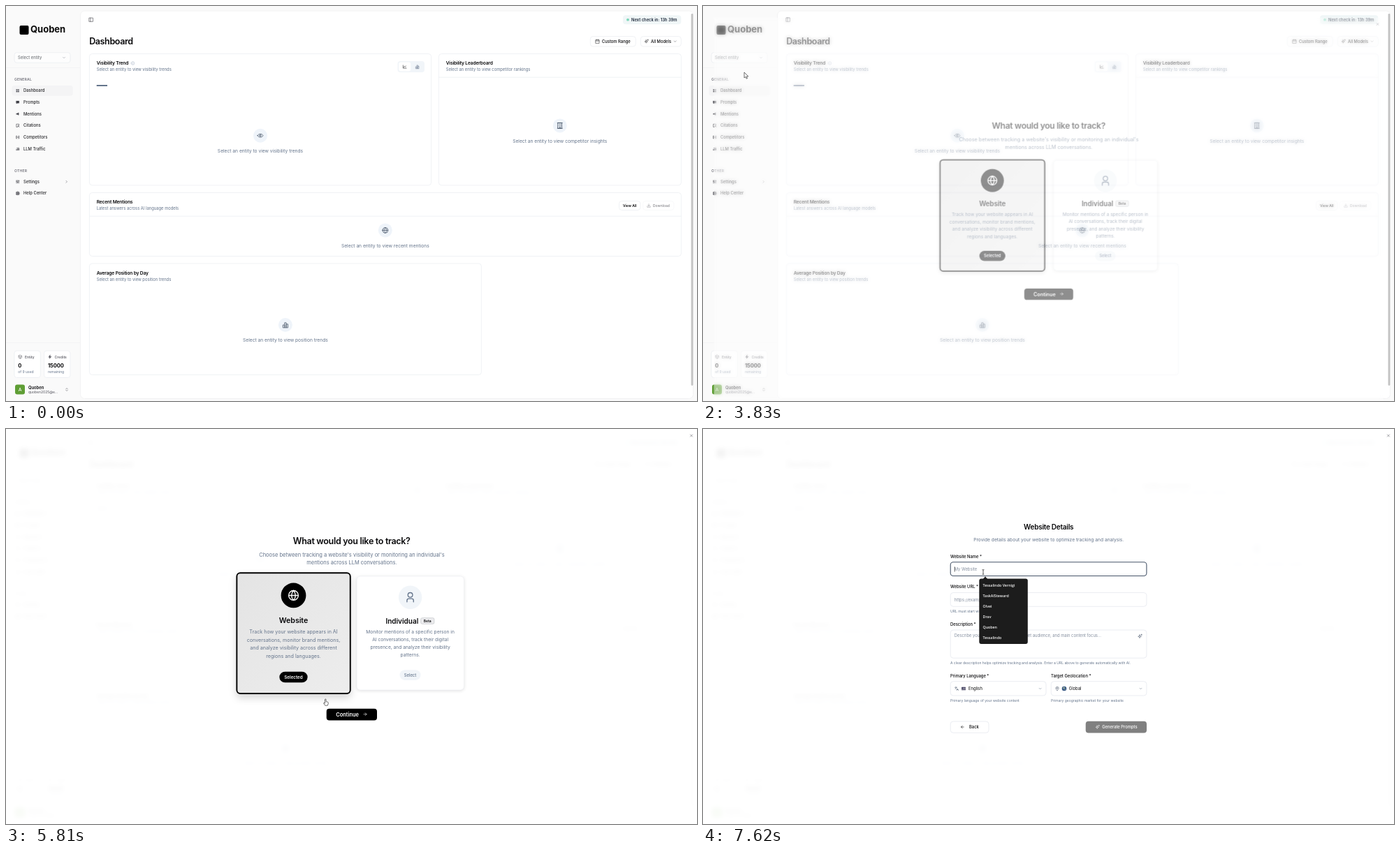
These frames come from a looping animation (989x566 px, 8000 ms). An HTML page:

```html
<!DOCTYPE html>
<html lang="en">
<head>
<meta charset="utf-8">
<title>Dashboard walkthrough</title>
<style>
  html, body { margin: 0; width: 100%; height: 100%; overflow: hidden; background: #fafafa; }
  svg, #dialog { position: absolute; inset: 0; width: 100%; height: 100%; }
  svg { overflow: hidden; font-family: Inter, sans-serif; }
  text { white-space: pre; }
  #dialog { background: rgba(255, 255, 255, .955); backdrop-filter: blur(3px); }
  .soft { filter: drop-shadow(0 1.5px 2px rgba(0, 0, 0, .12)); }
</style>
</head>
<body>
<svg id="page" viewBox="0 0 989 566"></svg>
<div id="dialog"><svg id="steps" viewBox="0 0 989 566"></svg></div>
<svg id="top" viewBox="0 0 989 566"></svg>
<script>
const XS = 5, SM = 5.83, MD = 6.66, LG = 7.49, XL = 9.99, XXL = 12.49;
const INK = '#09090b', SLATE = '#64748b', LINE = '#e6eaef', PALE = '#f1f5f9';
const $ = id => document.getElementById(id);

// Drawing helpers: text is placed by its vertical middle, icons by their centre on a 24-unit grid.
const text = (x, y, s, size = SM, weight = 400, fill = INK, anchor = 'start', extra = '') =>
  `<text x="${x}" y="${y + size * .36}" font-size="${size}" font-weight="${weight}" fill="${fill}" text-anchor="${anchor}" ${extra}>${s}</text>`;
const mid = (x, y, s, size, weight, fill, extra) => text(x, y, s, size, weight, fill, 'middle', extra);
const tight = 'letter-spacing="-.025em"';
const rect = (x, y, w, h, r, fill = '#fff', stroke = 'none', sw = .6, extra = '') =>
  `<rect x="${x}" y="${y}" width="${w}" height="${h}" rx="${r}" fill="${fill}" stroke="${stroke}" stroke-width="${sw}" ${extra}/>`;
const line = (x1, y, x2, stroke = LINE, sw = .6) => `<path d="M${x1} ${y}H${x2}" stroke="${stroke}" stroke-width="${sw}"/>`;
const circle = (x, y, r, fill) => `<circle cx="${x}" cy="${y}" r="${r}" fill="${fill}"/>`;
const icon = (x, y, size, name, stroke = SLATE, fill = 'none', sw = 2) =>
  `<path d="${icons[name]}" transform="translate(${x - size / 2} ${y - size / 2}) scale(${size / 24})" fill="${fill}" stroke="${stroke}" stroke-width="${sw}" stroke-linecap="round" stroke-linejoin="round"/>`;

const ring = 'M2 12a10 10 0 1 0 20 0a10 10 0 1 0-20 0';
const icons = {
  down: 'M6 9l6 6 6-6', right: 'M9 18l6-6-6-6', upDown: 'M7 15l5 5 5-5M7 9l5-5 5 5',
  panel: 'M3 3h18v18H3zM9 3v18',
  calendar: 'M8 2v4M16 2v4M3 4h18v18H3zM3 10h18',
  sparkles: 'M11 5l2 6 6 2-6 2-2 6-2-6-6-2 6-2zM20 2v5M17.500 4.500h5',
  eye: 'M2 12c4-8 16-8 20 0-4 8-16 8-20 0zM9 12a3 3 0 1 0 6 0a3 3 0 1 0-6 0',
  globe: ring + 'M2 12h20M12 2c5.500 6 5.500 14 0 20-5.500-6-5.500-14 0-20',
  building: 'M5 2h14v20H5zM9 6h1M14 6h1M9 10h1M14 10h1M9 14h1M14 14h1M10 22v-4h4v4M3 22h18M3 2h18',
  bars: 'M3 21v-9h6v9zM9 21V4h6v17zM15 21V9h6v12z',
  info: ring + 'M12 16v-4M12 8h.01',
  trend: 'M3 4v16h18M19 8l-5 5-4-3-4 5',
  download: 'M12 3v12M7 10l5 5 5-5M3 16v5h18v-5',
  plus: 'M5 12h14M12 5v14',
  box: 'M12 2l9 5v10l-9 5-9-5V7zM3 7l9 5 9-5M12 12v10',
  bolt: 'M13 2L4 14h7l-1 8L20 10h-8z',
  user: 'M7 7a5 5 0 1 0 10 0a5 5 0 1 0-10 0M5 22v-3a4 4 0 0 1 4-4h6a4 4 0 0 1 4 4v3',
  next: 'M5 12h14M12 5l7 7-7 7', back: 'M19 12H5M12 19l-7-7 7-7',
  close: 'M18 6L6 18M6 6l12 12',
  pin: 'M12 22c-4-5-8-8-8-12a8 8 0 0 1 16 0c0 4-4 7-8 12zM9 10a3 3 0 1 0 6 0a3 3 0 1 0-6 0',
  translate: 'M5 8l6 6M4 14l6-6 2-3M2 5h12M7 2h1M22 22l-5-10-5 10M14 18h6',
  grid: 'M4 4h6v6H4zM14 4h6v6h-6zM4 14h6v6H4zM14 14h6v6h-6z',
  chat: 'M3 4h18v13H11l-5 4v-4H3z',
  horn: 'M4 9h5l9-5v16l-9-5H4zM21 10v4',
  search: 'M20 10V3H4v18h7M13 15a3 3 0 1 0 6 0a3 3 0 1 0-6 0M18.500 17.500L22 21',
  versus: 'M7 4H3v16h4M17 4h4v16h-4M9 9v6M15 9v6',
  traffic: 'M3 20v-5h4v5zM10 20v-9h4v9zM17 20V8h4v12zM4 9l6-4 4 2 6-4',
  sliders: 'M5 3v18M12 3v18M19 3v18M3 9h4M10 15h4M17 7h4'
};

function navItem(y, label, name, solid) {
  return icon(16.7, y, 5.6, name, '#3f3f46', solid ? '#3f3f46' : 'none', solid ? 1 : 2.6) + text(25, y, label, SM, 500, '#27272a');
}
function card(x, y, w, h, title, subtitle, divider) {
  return rect(x, y, w, h, 4, '#fff', LINE) + text(x + 10.3, y + 13.6, title, MD, 600, INK, 'start', tight) +
    text(x + 10.3, y + 22.7, subtitle, SM, 400, SLATE) + (divider ? line(x, y + 33.7, x + w) : '');
}
const empty = (x, y, name, label) =>
  circle(x, y, 10, '#eff4fa') + icon(x, y, 9.5, name, '#475569') + mid(x, y + 22, label, MD, 400, SLATE);
const stat = (x, name, label, value, note, fill) =>
  rect(x, 494, 37.300, 38.500, 3.500, '#fff', LINE) + icon(x + 8.3, 502.7, 6, name, '#52525b', fill) +
  text(x + 15, 502.7, label, XS, 500, '#52525b') + text(x + 5.3, 515, value, LG, 700) + text(x + 5.3, 524, note, XS, 400, SLATE);

const main = [['Dashboard', 'grid', 1], ['Prompts', 'chat', 1], ['Mentions', 'horn', 1],
  ['Citations', 'search', 0], ['Competitors', 'versus', 0], ['LLM Traffic', 'traffic', 1]];

$('page').innerHTML =
  rect(0, 0, 989, 566, 0, '#fafafa') +
  rect(106.5, 7, 877, 555.5, 6, '#fff', '#f0f0f1', .8) +
  // sidebar
  rect(19.5, 28, 13, 13, 2, '#000') + text(35, 33.6, 'Quoben', 13, 700, '#0a0a0a') +
  rect(12, 66.7, 80, 14.6, 3.5, '#fdfdfd', '#e4e7ec') + text(17, 74, 'Select entity', SM, 400, '#5f6368') + icon(83, 74, 6, 'down', '#8b8f98') +
  line(0, 88.5, 106, '#f0f0f1') + line(0, 482.500, 106, '#f0f0f1') +
  text(12, 105.2, 'GENERAL', XS, 600, '#71717a', 'start', 'letter-spacing=".05em"') +
  rect(8.3, 114, 87.5, 14.6, 3.5, '#f4f4f5') +
  main.map(([label, name, solid], i) => navItem(121.3 + i * 16.68, label, name, solid)).join('') +
  text(12, 236, 'OTHER', XS, 600, '#71717a', 'start', 'letter-spacing=".05em"') +
  navItem(251.8, 'Settings', 'sliders') + icon(86.7, 251.8, 6, 'right', '#52525b') +
  navItem(268.4, 'Help Center', 'info') + circle(16.7, 268.4, 2.7, '#3f3f46') + icon(16.7, 268.4, 5, 'info', '#fff', 'none', 2.5) +
  stat(12, 'box', 'Entity', '0', 'of 9 used', 'none') + stat(54.6, 'bolt', 'Credits', '15000', 'remaining', '#52525b') +
  rect(13, 542.5, 14, 14, 3, '#5f9e35') + mid(20, 549.6, 'A', MD, 500, '#fff') +
  text(32, 546.5, 'Quoben', SM, 600) + text(32, 553.5, 'quoben2025@e...', XS, 400, '#52525b') + icon(87, 549.6, 6, 'upDown', '#3f3f46') +
  // header
  icon(121.8, 19.7, 7, 'panel', '#3f3f46') +
  rect(883, 13.2, 83.300, 13, 4, '#f0f6f7') + `<circle id="pulse" cx="890" cy="19.7" r="1.9" fill="#10b981"/>` +
  text(895, 19.7, 'Next check in: 13h 39m', SM, 600, '#1e293b') +
  text(119.2, 50.7, 'Dashboard', XXL, 600, INK, 'start', 'letter-spacing="-.03em"') +
  rect(836.3, 43.5, 65, 14.5, 4, '#fff', LINE) + icon(846.6, 50.7, 6.5, 'calendar', '#27272a') + text(853, 50.7, 'Custom Range', SM, 500) +
  rect(908.3, 43.5, 58, 14.5, 4, '#fff', LINE) + icon(916.5, 50.7, 6.5, 'sparkles', '#27272a') + text(923, 50.7, 'All Models', SM, 500) + icon(957.6, 50.7, 6, 'down', '#52525b') +
  // cards
  card(119.4, 68.5, 489.2, 188.4, 'Visibility Trend', 'Select an entity to view visibility trends') +
  icon(181.5, 82, 5.5, 'info', '#94a3b8') + line(129.700, 114, 145, SLATE, 2) +
  rect(560.5, 79, 38.5, 16, 4, PALE) + rect(562.2, 80.6, 17, 12.800, 3, '#fff') +
  icon(570.7, 87, 6.3, 'trend', INK) + icon(588.700, 87, 6.3, 'bars', SLATE) +
  empty(364, 185.7, 'eye', 'Select an entity to view visibility trends') +
  card(619.4, 68.5, 347, 188.4, 'Visibility Leaderboard', 'Select an entity to view competitor rankings', true) +
  empty(792.8, 171.4, 'building', 'Select an entity to view competitor insights') +
  card(119.4, 267.5, 847, 91, 'Recent Mentions', 'Latest answers across AI language models', true) +
  rect(877.5, 279.500, 30.500, 13, 4, '#fff', LINE) + mid(892.700, 286, 'View All', XS, 600) +
  rect(911.700, 279.500, 44.300, 13, 4, '#fff', '#f3f5f7') + icon(920, 286, 6, 'download', '#84848a') + text(926, 286, 'Download', XS, 500, '#84848a') +
  empty(542.8, 321.4, 'globe', 'Select an entity to view recent mentions') +
  card(119.4, 369, 561, 159.5, 'Average Position by Day', 'Select an entity to view position trends') +
  empty(399.9, 457, 'bars', 'Select an entity to view position trends') +
  rect(980.6, 11, 2.8, 533, 1.4, '#c3c3c3') +
  // entity menu
  `<g id="menu">${rect(12, 84, 80.5, 16.700, 3.5, '#fff', '#e4e7ec', .6, 'class="soft"')}${rect(13.700, 85.700, 77, 13.200, 2.5, PALE)}` +
  icon(20.4, 92, 6, 'plus', '#475569') + text(27, 92, 'Add new tracking', SM, 500, '#1e293b') + '</g>';

// First step: choose what to track
const lines = (x, y, rows) => rows.map((row, i) => mid(x, y + i * 10.8, row, MD, 400, SLATE)).join('');
const choice =
  mid(494.7, 160.200, 'What would you like to track?', XXL, 600, INK, tight) +
  mid(494.9, 180.3, "Choose between tracking a website's visibility or monitoring an individual's", LG, 400, SLATE) +
  mid(494.9, 191.8, 'mentions across LLM conversations.', LG, 400, SLATE) +
  rect(502, 211, 153.4, 163, 5, '#fff', '#eceff3', .6, 'class="soft"') +
  circle(578.600, 241.200, 16.700, PALE) + icon(578.600, 241.200, 16, 'user', SLATE) +
  text(543.400, 275, 'Individual', XL, 600) + rect(593.700, 270.700, 19.200, 8.600, 2, '#ececee', '#b9bcc2') + mid(603.300, 275, 'Beta', XS, 600) +
  lines(578.600, 290.800, ['Monitor mentions of a specific person in', 'AI conversations, track their digital', 'presence, and analyze their visibility', 'patterns.']) +
  rect(563.500, 345.200, 30, 14.700, 7.300, PALE) + mid(578.500, 352.600, 'Select', SM, 500, SLATE) +
  '<g id="website">' + rect(335.700, 211.900, 151.700, 161.400, 4.600, 'url(#shade)', '#000', 1.800, 'id="websiteBox"') +
  circle(411.500, 242, 16.700, '#000') + icon(411.500, 242, 15.500, 'globe', '#fff') +
  mid(411.500, 275.200, 'Website', XL, 600, INK, 'letter-spacing="-.01em"') +
  lines(411.500, 290.900, ['Track how your website appears in AI', 'conversations, monitor brand mentions,', 'and analyze visibility across different', 'regions and languages.']) +
  rect(392.700, 344, 37.600, 14.700, 7.350, '#000') + mid(411.500, 351.400, 'Selected', SM, 600, '#fff') + '</g>' +
  rect(458.700, 400.800, 72.300, 16.700, 4, '#000', 'none', 0, 'id="continue"') + text(472.200, 409, 'Continue', LG, 600, '#fff') + icon(514, 408.700, 7, 'next', '#fff');

// Second step: website details
const label = (x, y, s) => text(x, y, s + ' *', SM, 500);
const hint = (x, y, s) => text(x, y, s, XS, 400, SLATE);
const field = (x, y, w, h, extra) => rect(x, y, w, h, 4, '#fff', '#e2e6ec', .7, extra);
const ghost = (y, s) => text(359.800, y, s, SM, 400, '#858f9f');
const names = ['Tessalindo Vernigi', 'TaskAISteward', 'Olvei', 'Drav', 'Quoben', 'Tessalindo'];
const details =
  mid(494.700, 140.300, 'Website Details', XL, 600, INK, tight) +
  mid(494.700, 159, 'Provide details about your website to optimize tracking and analysis.', MD, 400, SLATE) +
  label(354, 182.700, 'Website Name') + field(354.200, 190.700, 280.700, 19.800, 'id="nameField"') + ghost(200.900, 'My Website') +
  label(354, 226.200, 'Website URL') + field(354.200, 234.500, 280.700, 19.800) + ghost(244.600, 'https://example.com') + hint(354, 261, 'URL must start with https://') +
  label(354, 279.800, 'Description') + field(354.200, 288, 280.700, 40.200) +
  ghost(295.800, "Describe your website's purpose, target audience, and main content focus...") + icon(625.300, 297, 7, 'sparkles', '#475569') +
  hint(354, 335.200, 'A clear description helps optimize tracking and analysis. Enter a URL above to generate automatically with AI.') +
  label(354, 354, 'Primary Language') + field(354.200, 361.700, 136.800, 20.300) + icon(363, 372, 6, 'translate', '#475569') +
  rect(370, 369.800, 6, 4.500, .5, '#4b4a68') + line(372, 371.500, 376, '#d8d4dc', .5) + line(370, 373, 376, '#d8d4dc', .5) +
  text(380, 372, 'English') + icon(482.600, 372, 6, 'down') + hint(354, 388.800, 'Primary language of your website content') +
  label(498, 354, 'Target Geolocation') + field(498.200, 361.700, 136.700, 20.300) + icon(507, 372, 6.500, 'pin', '#475569') +
  circle(517, 372, 3.300, '#3b5b86') + `<path d="M515 370.500l2-1 1 1.500-1.500 2zM517.500 373l1.500-.5-.7 1.700z" fill="#9db6a0"/>` +
  text(523.800, 372, 'Global') + icon(626.500, 372, 6, 'down') + hint(498, 388.800, 'Primary geographic market for your website') +
  rect(354.200, 419, 54.800, 16.300, 4, '#fff', '#e2e6ec', .7) + icon(371.300, 427, 6.500, 'back', INK) + text(381, 427.200, 'Back', SM, 500) +
  rect(547.700, 418.800, 87.300, 16.700, 4, '#808080') + icon(564.500, 427, 6.500, 'sparkles', '#fff') + text(571.200, 427.200, 'Generate Prompts', SM, 500, '#fff') +
  '<path id="caret" d="M360.200 197.300v7.400" stroke="#111" stroke-width=".6"/>' +
  '<g id="suggest"><path d="M400.300 215.500l3.700-4.200 3.700 4.200z" fill="#1c1c1c"/>' + rect(395.300, 214.500, 69.500, 93.500, 3, '#1c1c1c') +
  names.map((s, i) => text(400.500, 224 + i * 15, s, 5.300, 600, '#f4f4f4', 'start', 'font-family="Open Sans, sans-serif"')).join('') + '</g>';

$('steps').innerHTML =
  '<defs><linearGradient id="shade" x2="1" y2="1"><stop stop-color="#e4e4e4"/><stop offset="1" stop-color="#ededed"/></linearGradient></defs>' +
  icon(981, 9.500, 6.300, 'close', '#52525b') + `<g id="choice">${choice}</g><g id="details">${details}</g>`;

const outline = 'fill="#fff" stroke="#111" stroke-width=".6" stroke-linejoin="round"';
$('top').innerHTML = '<g id="cursor">' +
  `<path id="arrow" ${outline} d="M0 0V8L1.900 6.400L3.200 9.200L4.500 8.600L3.300 5.900H5.800z"/>` +
  `<path id="hand" ${outline} d="M-.8.600a.8.800 0 0 1 1.600 0V3.500l2.500.6q.8.300.7 1.200l-.5 2.400-.5 1.300H-.6L-2.500 6.200q-.5-1 .4-1l1.300.7z"/>` +
  '<path id="beam" fill="none" stroke="#111" stroke-width=".7" d="M-1.400-3.500Q0-3.500 0-2.600V2.600Q0 3.500-1.400 3.500M1.400-3.500Q0-3.500 0-2.600M0 2.600Q0 3.500 1.400 3.500"/></g>';

// Pointer route: time, x, y
const route = [[600, 957, 564], [690, 800, 420], [760, 590, 270], [830, 380, 165], [900, 262, 124], [980, 262, 124],
  [1250, 125, 92], [1640, 60, 73], [2330, 60, 73], [2880, 59, 95], [4090, 59, 95], [4290, 193, 155], [4560, 365, 300],
  [4900, 409, 352], [5190, 411, 354], [5480, 411, 354], [5760, 450, 383], [6200, 505, 411], [6790, 505, 411], [7050, 452, 305], [7340, 401, 205]];

const slope = (i, c) => (route[i + 1][c] - route[i][c]) / (route[i + 1][0] - route[i][0]);
function tangent(i, c) {
  if (i < 1 || i > route.length - 2) return 0;
  const a = slope(i - 1, c), b = slope(i, c);
  return a * b > 0 ? 2 * a * b / (a + b) : 0;
}
// Monotone cubic through the route points
function along(t, c) {
  const last = route.length - 1;
  if (t <= route[0][0]) return route[0][c];
  if (t >= route[last][0]) return route[last][c];
  const i = route.findIndex(p => p[0] > t) - 1;
  const span = route[i + 1][0] - route[i][0], u = (t - route[i][0]) / span, v = 1 - u;
  return v * v * (1 + 2 * u) * route[i][c] + u * u * (3 - 2 * u) * route[i + 1][c] +
    span * u * v * (v * tangent(i, c) - u * tangent(i + 1, c));
}
const ramp = (t, from, to) => Math.min(1, Math.max(0, (t - from) / (to - from)));
const ease = (t, from, to) => { const u = ramp(t, from, to); return u * u * (3 - 2 * u); };
const show = (id, on) => $(id).style.display = on ? '' : 'none';

function draw() {
  const t = performance.now() % 8000;
  $('pulse').setAttribute('opacity', .75 - .25 * Math.cos((t + 100) / 1000 * Math.PI));

  const open = ease(t, 1770, 1940);
  $('menu').setAttribute('opacity', open * (1 - ramp(t, 3590, 3700)));
  $('menu').setAttribute('transform', `translate(0 ${-3 * (1 - open)})`);

  const e = ease(t, 3720, 3960);
  show('dialog', e > 0);
  $('dialog').style.opacity = e;
  $('dialog').style.transform = e < 1 ? `translateY(${14 * (1 - e)}px) scale(${.943 + .057 * e})` : 'none';

  const hover = ease(t, 4520, 4900) - ease(t, 5790, 6180);
  const scale = 1.02 * (1 + .05 * hover);
  $('website').setAttribute('transform', `translate(411.500 292.500) scale(${scale}) translate(-411.500 -292.500)`);
  $('websiteBox').style.filter = `drop-shadow(0 ${2 + 4 * hover}px ${2.5 + 2.5 * hover}px rgba(0,0,0,.16))`;
  const grey = Math.round(26 * ramp(t, 5960, 6100));
  $('continue').setAttribute('fill', `rgb(${grey},${grey},${grey})`);

  show('choice', t < 6480);
  show('details', t >= 6480);
  $('details').setAttribute('opacity', ramp(t, 6460, 6570));
  const focused = t >= 7520;
  $('nameField').setAttribute('stroke', focused ? '#475569' : '#e2e6ec');
  $('nameField').setAttribute('stroke-width', focused ? 1.1 : .7);
  show('caret', focused);
  show('suggest', t >= 7600);

  const x = along(t, 1), y = along(t, 2);
  const hand = t > 4500 && t < 6480, beam = t > 6480 && y < 328;
  show('cursor', t >= 610);
  $('cursor').setAttribute('transform', `translate(${x} ${y})`);
  show('hand', hand);
  show('beam', beam);
  show('arrow', !hand && !beam);
  requestAnimationFrame(draw);
}
draw();
</script>
</body>
</html>
```
